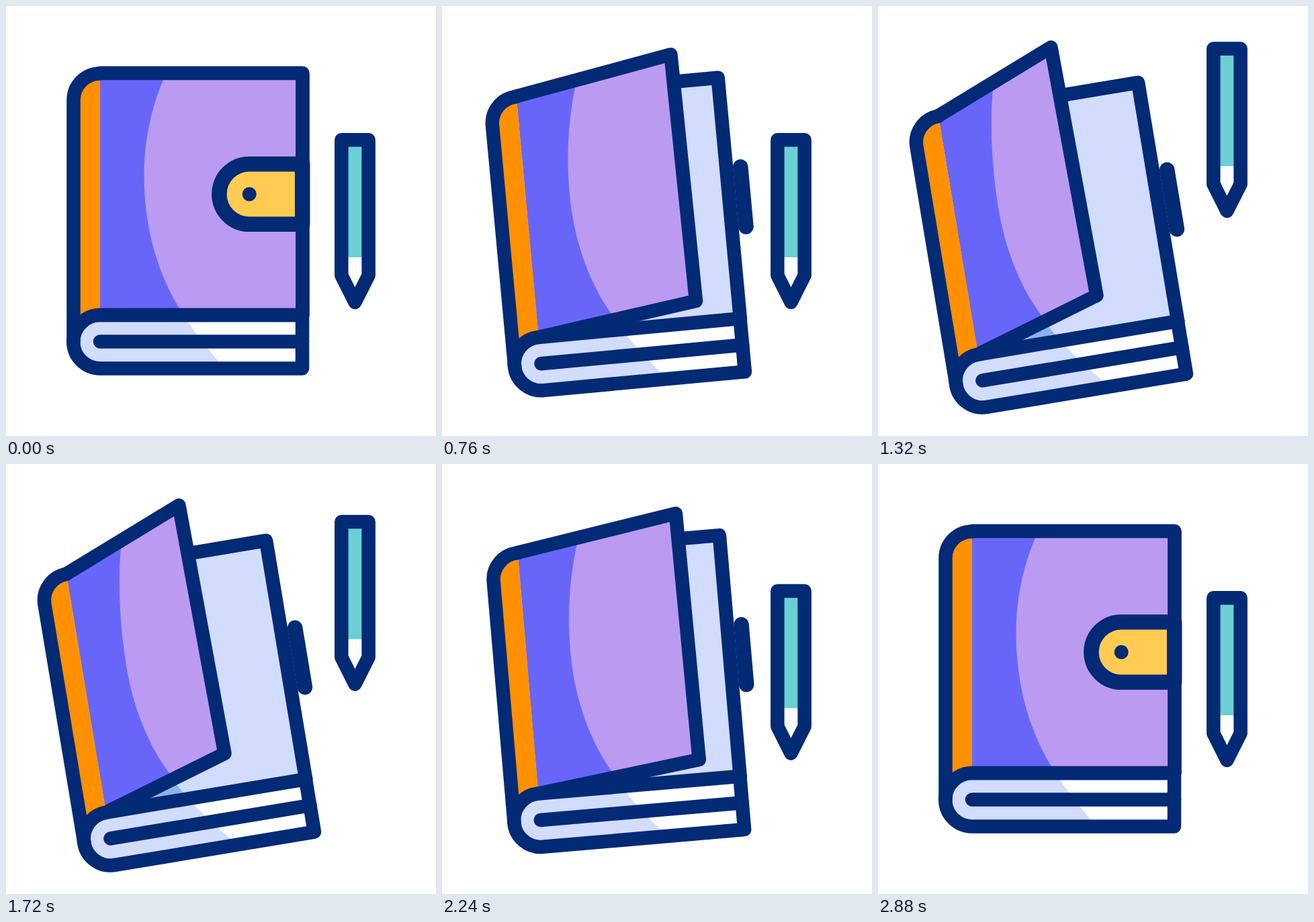
An HTML page that plays this animation: 640 px wide and 640 px high, repeating every 3 s.

```html
<!DOCTYPE html>
<html lang="en">
<head>
<meta charset="utf-8">
<title>Notebook and pencil</title>
<style>
  html, body { margin: 0; width: 100%; height: 100%; overflow: hidden; background: #fff; }
  svg { display: block; width: 100vw; height: 100vh; }
  .line { fill: none; stroke: #032a75; stroke-width: 20.5; stroke-linecap: round; stroke-linejoin: round; }
  .clasp { fill: #ffcb52; stroke-width: 22.5; }
</style>
</head>
<body>
<svg viewBox="0 0 640 640">
  <g id="book">
    <!-- back cover and inner page -->
    <path fill="#d2dcfd" d="M140 100H441V460H140Z"/>
    <path fill="#8fb0ef" d="M140 250H205.5C205.5 322 222 390 258 450L264 460H140Z"/>
    <path class="line" d="M140 100H441.3V460"/>
    <!-- page edges -->
    <path fill="#fff" d="M140 460H441V540H140Z"/>
    <path fill="#d2dcfd" d="M140 460H264Q290 500 326 540H140A40 40 0 0 1 140 460Z"/>
    <path class="line" d="M140 499.5H441"/>
    <!-- front cover -->
    <path id="cover" fill="#bb9af2"/>
    <path id="shade" fill="#6866f9"/>
    <path id="edge" class="line"/>
    <!-- spine -->
    <path fill="#ff9100" d="M140 100V460Q112 460 100.5 490V140A39.5 39.5 0 0 1 140 100Z"/>
    <path class="line" d="M140 100.5A39.5 39.5 0 0 0 100.5 140V499.5"/>
    <path class="line" d="M441.5 460H140A39.5 39.5 0 0 0 140 539.5H441V460"/>
    <path id="clasp" class="line clasp"/>
    <circle id="dot" cy="280" r="10.5" fill="#032a75"/>
  </g>
  <g id="pencil">
    <path fill="#fff" d="M499.5 199.5H539.5V401L519.5 441L499.5 401Z"/>
    <path fill="#6acfd3" d="M499.5 199.5H539.5V374H499.5Z"/>
    <path class="line" d="M499.3 199.3H539.6V401L519.4 441L499.3 401Z"/>
  </g>
</svg>
<script>
const LOOP = 3000, STEP = 40;
const TILT = 9.45, LIFT = 146;
const $ = id => document.getElementById(id);
const book = $('book'), cover = $('cover'), shade = $('shade'), edge = $('edge');
const clasp = $('clasp'), dot = $('dot'), pencil = $('pencil');

const ease = (t, from, to) => {
  const u = Math.min(1, Math.max(0, (t - from) / (to - from)));
  return u * u * (3 - 2 * u);
};
const pulse = (t, a, b, c, d) => ease(t, a, b) - ease(t, c, d);
const mix = (a, b, k) => a.map((v, i) => v + (b[i] - v) * k);

function drawCover(p) {
  const tr = mix([441.3, 100], [322, 27], p);
  const br = mix([441.3, 460], [328.5, 402.5], p);
  const outline = `M140 100L${tr}L${br}L140 460`;
  cover.setAttribute('d', outline + 'Z');
  edge.setAttribute('d', outline);

  // boundary between the dark and light halves
  const [tx, ty] = mix([234, 110], [226, 76], p);
  const [bx, by] = mix([258, 450], [243, 419.5], p);
  const mx = 205.5, my = 252, up = my - ty, down = by - my;
  shade.setAttribute('d', `M140 100L${tx + 4} ${ty - 10}L${tx} ${ty}` +
    `C${tx + 0.63 * (mx - tx)} ${ty + 0.3 * up} ${mx} ${my - 0.36 * up} ${mx} ${my}` +
    `C${mx} ${my + 0.35 * down} ${bx - 0.69 * (bx - mx)} ${by - 0.3 * down} ${bx} ${by}` +
    `L${bx + 6} ${by + 10}L140 460Z`);
}

function drawClasp(q) {
  const w = 1 - q, right = 441.2 + 21.3 * q, bend = right - 79 * w;
  clasp.setAttribute('d',
    `M${right} 235.2H${bend}A${44.8 * w} 44.8 0 0 0 ${bend} 324.8H${right}Z`);
  dot.setAttribute('cx', bend);
}

function draw(t) {
  const open = pulse(t, 400, 1067, 1860, 2640);
  book.setAttribute('transform', `rotate(${-TILT * open} 498.5 435)`);
  drawCover(open);
  drawClasp(pulse(t, 200, 433, 2647, 2880));
  pencil.setAttribute('transform', `translate(0 ${-LIFT * pulse(t, 800, 1420, 1420, 2400)})`);
}

const start = performance.now();
function tick() {
  const t = (performance.now() - start) % LOOP;
  draw(Math.floor(t / STEP) * STEP);
  requestAnimationFrame(tick);
}
draw(0);
requestAnimationFrame(tick);
</script>
</body>
</html>
```
